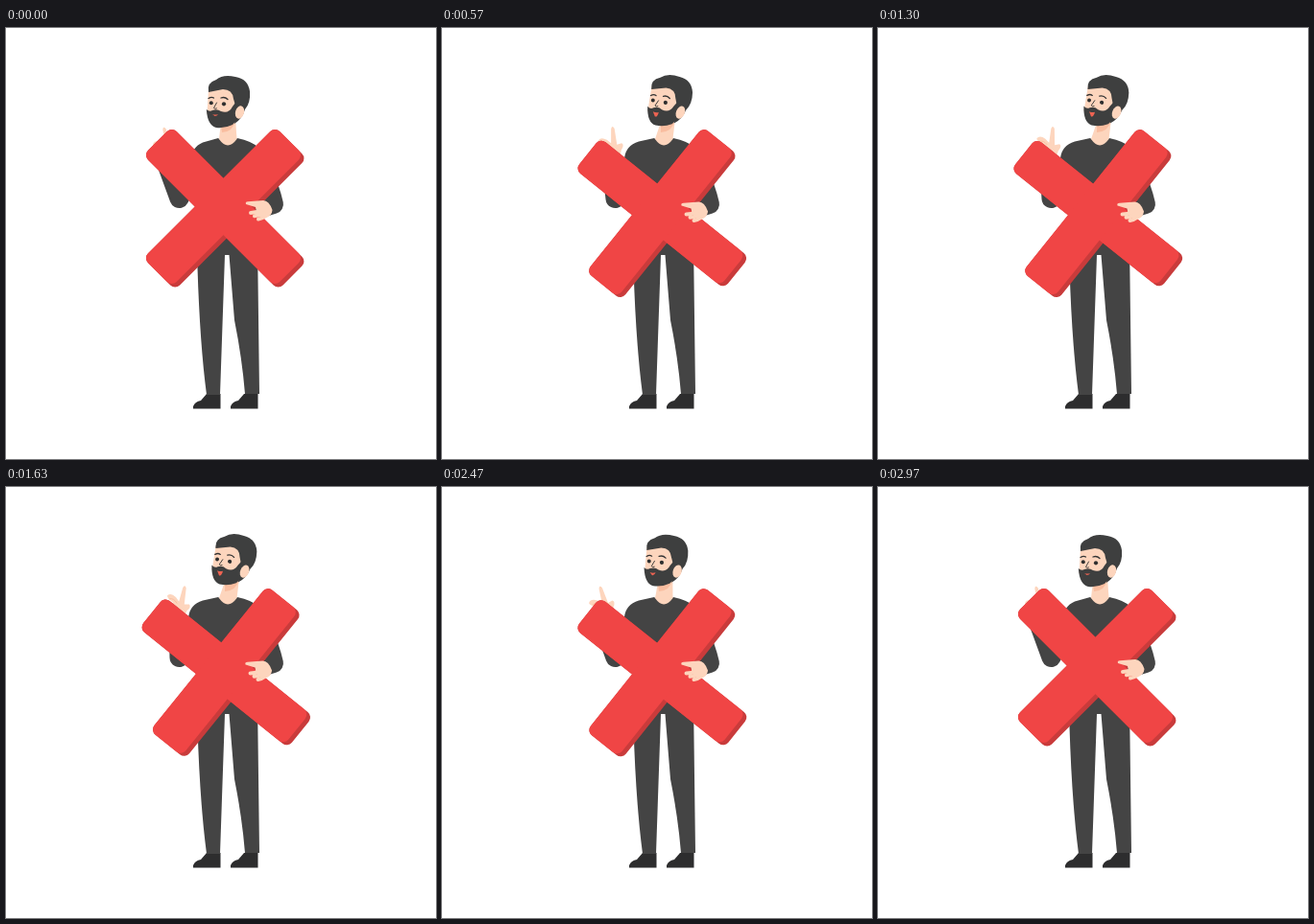
An HTML page for the animation above (3010 ms loop, 448 px wide and 450 px high).

```html
<!DOCTYPE html>
<html lang="en">
<head>
<meta charset="utf-8">
<title>Man with a red cross</title>
<style>
  html, body { margin: 0; width: 100%; height: 100%; overflow: hidden; background: #fff; }
  svg { display: block; width: 448px; height: 450px; }
  .cloth { fill: #444; }
  .sleeve { fill: none; stroke: #444; stroke-width: 20; stroke-linecap: round; stroke-linejoin: round; }
  .skin { fill: #fdd5bd; }
  .finger { fill: none; stroke: #fdd5bd; stroke-width: 4; stroke-linecap: round; }
  .shade { fill: #f9bd9f; }
  .hair { fill: #3e3f3f; }
  .shoe { fill: #2d2d2e; }
  .line { fill: none; stroke: #343434; stroke-width: 1.3; stroke-linecap: round; }
  .thin { stroke-width: .9; }
  .front { fill: #f04545; }
  .side { fill: #c93b3b; }
</style>
</head>
<body>
<svg viewBox="0 0 448 450">
  <!-- legs and shoes -->
  <g id="shoes" class="shoe"></g>
  <path class="cloth" d="M199 222H262L264 382H249Q246 345 238 305L232.500 237H228L223 383H209Q202 330 199.500 250Z"/>

  <!-- raised arm -->
  <g id="hand">
    <path class="skin" d="M-9 0Q-16 -3 -16 -6Q-13 -10 -7 -6L-3 -2L-1.500 -17Q0 -21 2 -17L3 0L8 -1Q11 1 7 6L4 16H-8Z"/>
    <path class="line thin" style="stroke:#f9bd9f" d="M-13 -3Q-9 -5 -5 0"/>
  </g>
  <path class="sleeve" id="arm"/>

  <!-- torso and far arm -->
  <path class="sleeve" d="M253 130Q271 150 279 184L266 188"/>
  <path class="cloth" id="torso"/>
  <path class="skin" id="neck"/>
  <path class="shade" id="chinShade"/>

  <g id="head">
    <path class="skin" d="M211 64L209.500 90Q222 99 241 92V64Q226 54 211 64Z"/>
    <path class="hair" d="M211 67Q209 57 219 54Q226 48 239 51Q252 53 254 66Q255 78 249 85Q246 95 238 100L240 84L237 74Q236 64 226 64Z"/>
    <path class="hair" d="M208.800 85Q212 88 215 86Q220 84 224 87Q232 90 236 82L239 78L243 84Q243 95 236 101Q228 105 219 104Q210 102 208.800 85Z"/>
    <ellipse class="skin" cx="243.500" cy="88" rx="4.500" ry="6.800" transform="rotate(16 243.500 88)"/>
    <path class="line" d="M211 73.500Q214 71.500 216.500 73M224 73Q228 71.500 231 74.500"/>
    <path class="line thin" d="M219.500 78L216.500 83.500Q218 85 219.500 84"/>
    <g id="eyes" fill="#2e2e2e">
      <circle cx="213.800" cy="78.300" r="2"/>
      <circle cx="227" cy="79.300" r="2.100"/>
    </g>
    <path class="line thin" id="lids" d="M211 79Q214 77 216.500 79M224 80Q227 78 230 80.500"/>
    <path id="mouth" fill="#ee6352"/>
  </g>

  <g id="cross"></g>

  <!-- holding hand -->
  <g id="grip">
    <path class="skin" d="M250 184Q249 181.500 252 181.300L268 180Q274 180 277.500 190Q277 196 271 198Q261 199 260 187Z"/>
    <g id="fingers"></g>
  </g>
</svg>
<script>
const LOOP = 3010;
const el = id => document.getElementById(id);
const set = (id, name, value) => el(id).setAttribute(name, value);

// Fixed parts made by repetition
el('shoes').innerHTML = [195, 234].map(x =>
  `<path d="M${x} 397.5V395Q${x + 2} 390 ${x + 8} 389L${x + 14} 382H${x + 28.5}V397.5Z"/>`).join('');

el('fingers').innerHTML = [0, 1, 2].map(i =>
  `<path class="finger" d="M${267 + 2 * i} ${190 + 3 * i}Q${261 + 3 * i} ${193 + 3 * i} ${255 + 4 * i} ${193 + 3.3 * i}"/>`).join('');

function crossFace(name, depth) {
  const bar = (w, h) =>
    `<rect x="${-w / 2}" y="${-h / 2}" width="${w + depth}" height="${h}" rx="7"/>`;
  return `<g class="${name}">${bar(194, 42)}${bar(42, 194)}</g>`;
}
el('cross').innerHTML = crossFace('side', 4.8) + crossFace('front', 0);

// Motion: ease in, hold with a small swing, ease out
function smooth(a, b, t) {
  const u = Math.min(1, Math.max(0, (t - a) / (b - a)));
  return u * u * (3 - 2 * u);
}
const hold = (t, inEnd, outStart, outEnd) => smooth(0, inEnd, t) * (1 - smooth(outStart, outEnd, t));
const swing = (t, peak, period) => Math.cos(2 * Math.PI * (t - peak) / period);

function draw(t) {
  const lean = hold(t, 600, 2480, 2970) * (.97 + .03 * swing(t, 970, 1300));
  const turn = hold(t, 650, 1750, 2900);
  const raise = hold(t, 450, 2050, 2500);
  const wag = swing(t, 1630, 433);
  const x = 170 + raise * (11 + 1.8 * wag);
  const s = 6 * turn;

  set('cross', 'transform', `translate(${226.5 + lean} ${186.5 + 5.8 * lean}) rotate(${45 - 6.5 * lean})`);
  set('grip', 'transform', `translate(${-.5 * lean} ${1.5 * lean})`);
  set('hand', 'transform', `translate(${x} 122) rotate(${raise * (20 + 8 * wag) - 18})`);
  set('arm', 'd', `M203 ${134 - 2 * lean}L180.5 178L${x - 3} 141`);
  set('torso', 'd', `M221 115Q231 124 241 115Q256 118 263 125L264 234H199L198 170L${194 - 4 * lean} 136`
    + `Q${193 - 2 * lean} ${125 - 2 * lean} 205 ${119.5 - lean}Z`);

  set('neck', 'd', `M${224 + .7 * s} 98L${239 + .7 * s} 94L240.500 116Q231 129 222 116Z`);
  set('chinShade', 'd', `M${224 + .7 * s} 102L${238 + .7 * s} 98Q${237 + .5 * s} 108 ${225 + .5 * s} 109Z`);
  set('head', 'transform', `translate(${s} ${-turn}) rotate(${s} 232 80)`);
  set('mouth', 'd', `M215 90Q218 91 221 90Q220 ${92 + 4 * turn} 217.500 ${92 + 3 * turn}Z`);

  const shut = t > 1960 && t < 2100;
  set('eyes', 'visibility', shut ? 'hidden' : 'visible');
  set('lids', 'visibility', shut ? 'visible' : 'hidden');
}

const start = performance.now();
function tick() {
  draw((performance.now() - start) % LOOP);
  requestAnimationFrame(tick);
}
tick();
</script>
</body>
</html>
```
